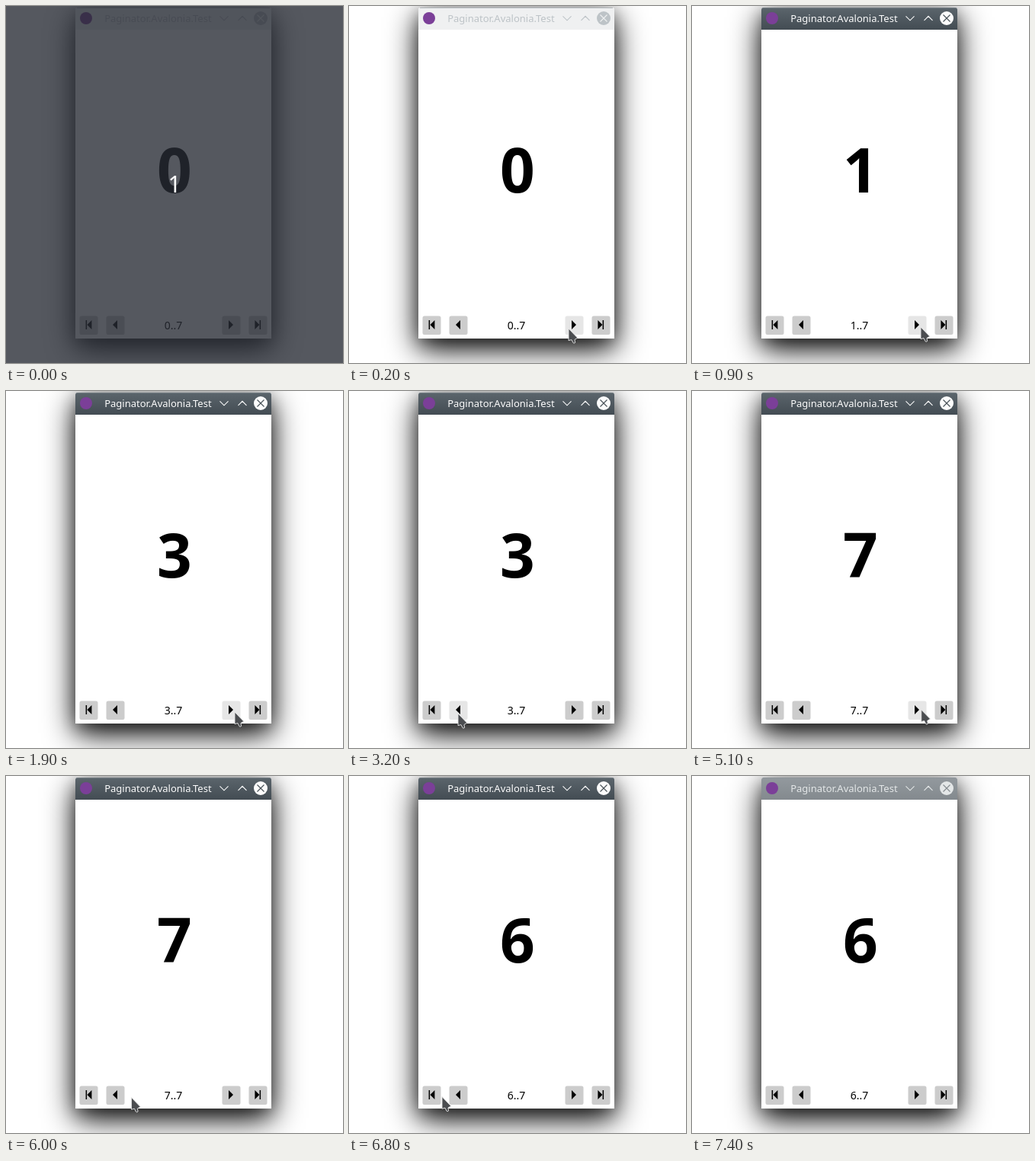
An HTML page for the animation above (7.5 s loop, 442 by 467 pixels).

```html
<!DOCTYPE html>
<html lang="en">
<head>
<meta charset="utf-8">
<title>Paginator</title>
<style>
  html, body { margin: 0; width: 100%; height: 100%; overflow: hidden; background: #fff; }
  svg { display: block; width: 442px; height: 467px; }
  text { font-family: "Noto Sans", sans-serif; }
</style>
</head>
<body>
<svg viewBox="0 0 442 467">
  <defs>
    <linearGradient id="bar" x1="0" y1="0" x2="0" y2="1">
      <stop offset="0" stop-color="#5b656c"/>
      <stop offset="1" stop-color="#434c53"/>
    </linearGradient>
    <filter id="wide" filterUnits="userSpaceOnUse" x="-60" y="-80" width="580" height="660">
      <feGaussianBlur stdDeviation="20"/>
    </filter>
    <filter id="near" filterUnits="userSpaceOnUse" x="-60" y="-80" width="580" height="660">
      <feGaussianBlur stdDeviation="10"/>
    </filter>
  </defs>
  <rect width="442" height="467" fill="#fff"/>
  <rect x="91" y="15" width="257" height="433" filter="url(#wide)"/>
  <rect x="91" y="8" width="257" height="433" opacity=".3" filter="url(#near)"/>

  <path d="M91 435V5q0-3 3-3H345q3 0 3 3V435z" fill="#fff"/>
  <path id="titleOff" d="M91 31V5q0-3 3-3H345q3 0 3 3V31z" fill="#eff0f1"/>
  <path id="titleOn" d="M91 31V5q0-3 3-3H345q3 0 3 3V31z" fill="url(#bar)"/>
  <path d="M93 2.5H346" stroke="#8d959a" stroke-opacity=".6"/>
  <circle cx="105" cy="16" r="8" fill="#7b3f98"/>
  <text id="title" x="129.2" y="21" font-size="13">Paginator.Avalonia.Test</text>
  <g id="chevrons" fill="none" stroke-width="1.1">
    <path d="M280.5 13.3l5.5 5.5 5.5-5.5M304.5 18.8l5.5-5.5 5.5 5.5"/>
  </g>
  <circle id="close" cx="334" cy="16" r="9"/>
  <path id="cross" d="M329.5 11.5l9 9M338.5 11.5l-9 9" stroke-width="1.1"/>

  <text id="page" x="221" y="244" font-size="80" font-weight="700" text-anchor="middle"></text>
  <text id="range" x="219.5" y="423" font-size="14" text-anchor="middle"></text>
  <g id="buttons"></g>
  <path id="cursor" d="M0 0V15.6L4 14.6L5.8 18.4Q7 20 8.6 18.4L8 14.4L11.8 12.2Z"
        fill="#4b4d50" stroke="#e8e8e8" stroke-width=".9" stroke-linejoin="round"/>
  <g id="countdown">
    <rect width="442" height="467" fill="#282c35" fill-opacity=".79"/>
    <text x="221" y="244" font-size="30" text-anchor="middle" fill="#fff">1</text>
  </g>
</svg>
<script>
const LOOP = 7500, STEP = 100, LAST_PAGE = 7;
const $ = id => document.getElementById(id);
const set = (el, attrs) => { for (const k in attrs) el.setAttribute(k, attrs[k]); };
const clamp = v => Math.min(1, Math.max(0, v));

const buttons = [
  [96.5, 'M104.6 411h1.5v12h-1.5zM112.4 411v12l-6-6z'],
  [131.5, 'M146 411v12l-6-6z'],
  [283.5, 'M292 411v12l6-6z'],
  [318.5, 'M326.4 411v12l6-6zM332.6 411h1.5v12h-1.5z']
].map(([x, icon]) => {
  const make = (tag, attrs) => {
    const el = document.createElementNS('http://www.w3.org/2000/svg', tag);
    set(el, attrs);
    return $('buttons').appendChild(el);
  };
  const face = make('rect', { x, y: 405.5, width: 24, height: 24.5, rx: 2.5 });
  make('path', { d: icon });
  return { x, face };
});

// [press time, page shown on release]
const clicks = [[500, 1], [1300, 2], [1800, 3], [2300, 4], [3100, 3], [4000, 0], [4500, 7], [6400, 6]];

// [start, end, x, y, ease-out power]
const moves = [
  [100, 300, 290, 421, 1],
  [500, 900, 300, 420, 2],
  [2400, 3000, 143, 422, 2],
  [3300, 3800, 109, 426, 2],
  [4100, 4300, 336, 411, 1],
  [4800, 5300, 294, 418, 2],
  [5600, 6300, 144, 421, 2.35],
  [6700, 7200, 34, 414, 1]
];

function pointer(t) {
  let x = 286, y = 423;
  for (const [from, to, tx, ty, power] of moves) {
    const k = 1 - (1 - clamp((t - from) / (to - from))) ** power;
    x += (tx - x) * k;
    y += (ty - y) * k;
  }
  return { x, y, visible: t >= 100 && t < 7300 };
}

function mix(off, on, k) {
  return `rgb(${off.map((v, i) => Math.round(v + (on[i] - v) * k))})`;
}

function drawTitle(active) {
  const ink = mix([189, 195, 199], [252, 252, 252], active);
  set($('titleOn'), { opacity: active });
  set($('title'), { fill: ink });
  set($('chevrons'), { stroke: ink });
  set($('close'), { fill: ink });
  set($('cross'), { stroke: mix([239, 240, 241], [70, 79, 86], active) });
}

function render(time) {
  const t = Math.floor(time % LOOP / STEP) * STEP;
  const { x, y, visible } = pointer(t);
  const pressed = clicks.some(([at]) => t >= at && t < at + STEP);
  let page = 0;
  for (const [at, next] of clicks) if (t >= at + STEP) page = next;

  $('page').textContent = page;
  $('range').textContent = `${page}..${LAST_PAGE}`;
  for (const b of buttons) {
    const over = visible && x >= b.x && x <= b.x + 24 && y >= 405 && y <= 430;
    set(b.face, { fill: !over ? '#ccc' : pressed ? '#999' : '#e6e6e6' });
  }
  drawTitle(clamp((t - 500) / 160) * (1 - clamp((t - 7340) / 160)));
  set($('cursor'), { transform: `translate(${x} ${y})`, visibility: visible ? 'visible' : 'hidden' });
  set($('countdown'), { visibility: t < 100 ? 'visible' : 'hidden' });
}

const start = performance.now();
function tick() {
  render(performance.now() - start);
  requestAnimationFrame(tick);
}
tick();
</script>
</body>
</html>
```
